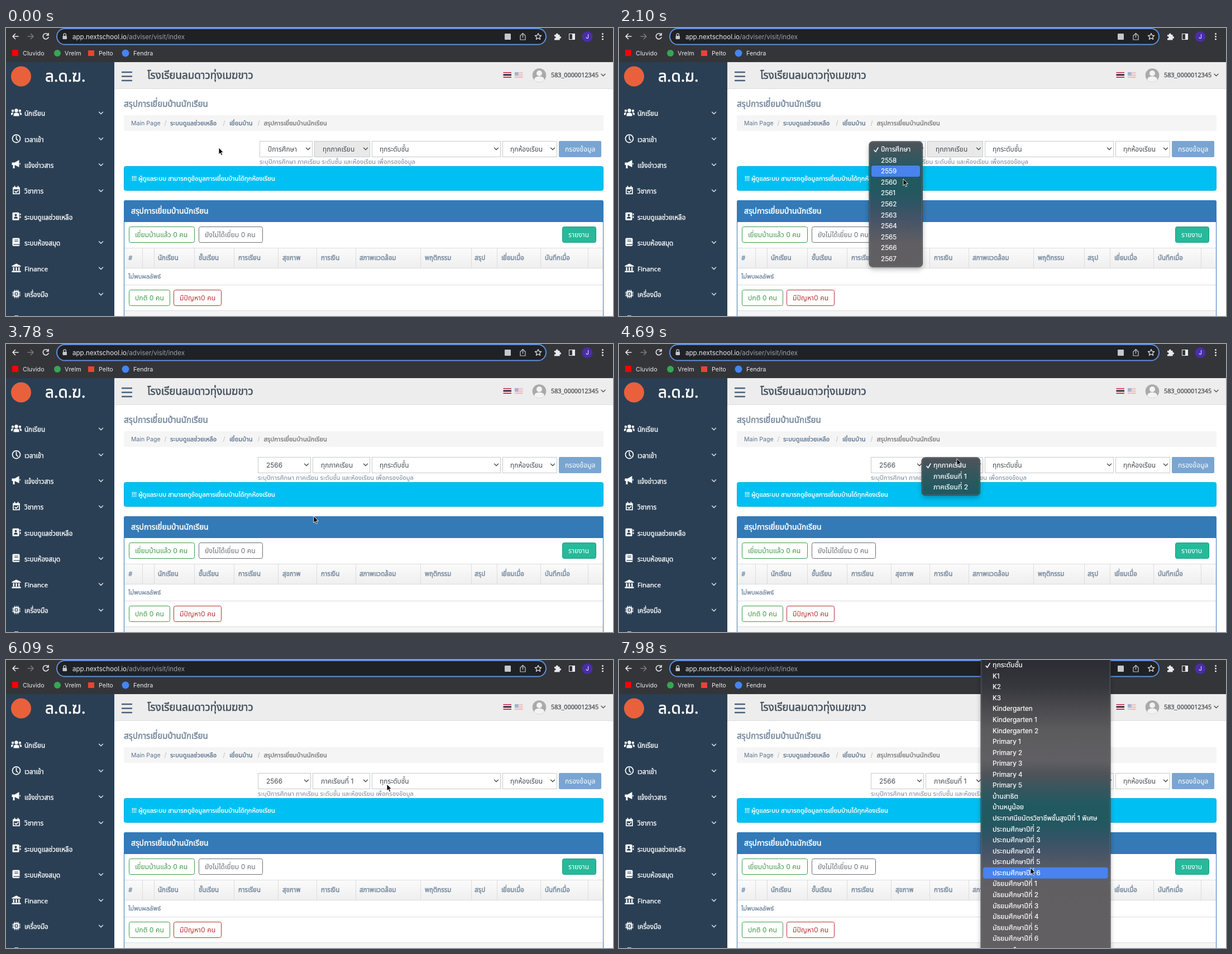
Write an HTML page that moves like this. It is 1087 by 515 pixels and loops after 8000 ms.

```html
<!DOCTYPE html>
<html lang="th">
<head>
<meta charset="utf-8">
<style>
html, body { margin: 0; width: 100%; height: 100%; overflow: hidden; background: #fff; }
svg { display: block; width: 1087px; height: 515px; }
text { font-family: Inter, 'Noto Sans Thai Looped', 'Noto Sans Thai', 'Noto Sans', sans-serif; white-space: pre; }
.b { font-family: 'Noto Sans Thai', 'Noto Sans', sans-serif; }
</style>
</head>
<body>
<svg viewBox="0 0 1087 515">
  <defs>
    <linearGradient id="glass" gradientUnits="userSpaceOnUse" x1="0" y1="0" x2="0" y2="515"></linearGradient>
    <linearGradient id="th" x2="0" y2="1"><stop stop-color="#fbfbfb"/><stop offset="1" stop-color="#efefef"/></linearGradient>
    <filter id="soft" x="-20%" y="-20%" width="140%" height="140%"><feGaussianBlur stdDeviation="5"/></filter>
  </defs>
  <g id="page"></g>
  <g id="live"></g>
</svg>
<script>
const $ = id => document.getElementById(id);
const text = (x, y, s, size, fill, more = '') =>
  `<text x="${x}" y="${y}" font-size="${size}" fill="${fill}" ${more}>${s}</text>`;
// a thin outline gives a medium weight
const medium = (x, y, s, size, fill, w = .35) =>
  text(x, y, s, size, fill, `class="b" stroke="${fill}" stroke-width="${w}"`);
// box given by its left, top, right and bottom edges
const box = (l, t, r, b, fill, more = '') =>
  `<rect x="${l}" y="${t}" width="${r - l}" height="${b - t}" fill="${fill}" ${more}/>`;
const frame = (l, t, r, b, stroke, fill = '#fff', rx = 0) =>
  box(l + .5, t + .5, r - .5, b - .5, fill, `stroke="${stroke}" rx="${rx}"`);
const dot = (x, y, r, fill, more = '') => `<circle cx="${x}" cy="${y}" r="${r}" fill="${fill}" ${more}/>`;
const line = (d, stroke, w = 1.5) =>
  `<path d="${d}" fill="none" stroke="${stroke}" stroke-width="${w}" stroke-linecap="round" stroke-linejoin="round"/>`;
const shape = (d, fill, more = '') => `<path d="${d}" fill="${fill}" ${more}/>`;
const chevron = (x, y, c, w = 1.4, r = 3.5) => line(`M${x - r} ${y - r / 2}l${r} ${r}l${r} ${-r}`, c, w);
const at = (x, y, s) => `<g transform="translate(${x} ${y})">${s}</g>`;

// blurred page seen through the open menus
$('glass').innerHTML = [[0, '#2c2d34'], [50, '#37383d'], [85, '#4a4a4e'], [125, '#5b5a5d'], [180, '#605f63'],
  [205, '#4e5359'], [230, '#37565e'], [258, '#225961'], [290, '#225860'], [315, '#305464'],
  [345, '#475468'], [385, '#605e62'], [515, '#625f62']]
  .map(([y, c]) => `<stop offset="${y / 515}" stop-color="${c}"/>`).join('');

function browserBar() {
  const w = '#e8eaed', g = '#c4c7cb';
  return box(0, 0, 1087, 61, '#343539') +
    line('M22 15H12M16.5 10.5L12 15l4.500 4.500', w, 1.6) +
    line('M39 15h10M44.500 10.500L49 15l-4.500 4.500', '#77797d', 1.6) +
    line('M75.500 12A5 5 0 1 0 76 16.500M76 9.500v3.500h-3.500', w, 1.6) +
    box(91, 1, 967, 29.500, '#202124', 'rx="14.2" stroke="#5f8fdc" stroke-width="2"') +
    box(101.500, 14, 109, 20, g, 'rx="1"') + line('M103 14v-2a2.200 2.200 0 0 1 4.400 0v2', g, 1.3) +
    text(119, 19.500, 'app.nextschool.io<tspan fill="#9aa0a6">/adviser/visit/index</tspan>', 11.6, w) +
    box(893, 10, 904, 21, g, 'rx="1"') +
    line('M923 13h-2v8h9v-8h-2M925.500 17V9.500M922.800 12l2.700-2.700l2.700 2.700', g, 1.2) +
    line('M953 9.500l1.700 3.700l4 .4l-3 2.700l.9 4l-3.600-2.100l-3.600 2.100l.9-4l-3-2.700l4-.4z', w, 1.2) +
    shape('M982 12h3a1.900 1.900 0 1 1 3.600 0h3v3a1.900 1.900 0 1 1 0 3.600v3h-9.600v-3.300a1.700 1.700 0 1 0 0-3z', w) +
    frame(1008, 10, 1019, 21, w, 'none') + box(1014, 10, 1019, 21, w) +
    dot(1041, 15.500, 9.500, '#4a2da8') + text(1041, 19.200, 'J', 10, '#fff', 'text-anchor="middle"') +
    [10.5, 15.2, 20].map(y => dot(1068.500, y, 1.5, w)).join('') +
    box(11, 39, 22, 50, '#f00', 'rx="1"') + dot(92, 45, 6, '#34a853') +
    box(147, 40, 158, 50, '#ea4335') + dot(214, 45, 6.5, '#4285f4') +
    [[30, 'Cluvido'], [105, 'Vrelm'], [166, 'Pelto'], [228, 'Fendra']]
      .map(([x, s]) => text(x, 48.800, s, 10.8, w)).join('');
}

const icons = [
  // people
  dot(0, -4, 3.2, '#fff') + dot(-6.500, -3.500, 2.2, '#fff') + dot(6.500, -3.500, 2.2, '#fff') +
    shape('M-5 6v-2a4 4 0 0 1 4-4h2a4 4 0 0 1 4 4v2zM-9.500 4v-2q0-3 4-2.500l-1.500 4.500zM9.500 4v-2q0-3-4-2.500l1.500 4.500z', '#fff'),
  // clock
  line('M-7 0a7 7 0 1 1 14 0a7 7 0 1 1-14 0M0-4.500V0.500l2.500 2.500', '#fff', 1.7),
  // megaphone
  shape('M-8-3.500h5l8-4.500v13l-8-4v6h-3v-6h-2zM6-3q3 1.500 0 4z', '#fff'),
  // calendar
  line('M-5.500-5h11v11h-11zM-3-7.500v2M3-7.500v2M-2.500 1.500l2 2l3.500-3.500', '#fff', 1.7) + box(-5, -5, 5, -2, '#fff'),
  // address book
  box(-7, -7, 5, 7, '#fff', 'rx="1.5"') + box(6, -5, 8, -2, '#fff') + box(6, 0, 8, 3, '#fff') +
    dot(-1, -2.300, 2, '#2a3f54') + shape('M-4.500 4q0-3.500 3.500-3.500t3.500 3.500z', '#2a3f54'),
  // book
  box(-7, -7.500, 6, 7, '#fff', 'rx="2"') + line('M-3-4H3M-3-1.500H3M-4.500 4.200H5.500', '#2a3f54', 1.2),
  // bank
  shape('M0-8l8 4v1.500h-16v-1.500zM-6-1.500h2.500v6h-2.500zM-1.300-1.500h2.600v6h-2.600zM3.500-1.500h2.500v6h-2.500zM-8 5h16v2.500h-16z', '#fff'),
  // chip
  box(-5, -5, 5, 5, '#fff', 'rx="1"') + line('M-7-3H7M-7 0H7M-7 3H7M-3-7V7M0-7V7M3-7V7', '#fff', 1.2) +
    box(-2.800, -2.800, 2.800, 2.800, '#2a3f54') + box(-1.500, -1.500, 1.500, 1.500, '#fff')
];
const sections = ['นักเรียน', 'เวลาเข้า', 'แจ้งข่าวสาร', 'วิชาการ', 'ระบบดูแลช่วยเหลือ', 'ระบบห้องสมุด', 'Finance', 'เครื่องมือ'];

function sidebar() {
  return box(0, 61, 194, 515, '#2a3f54') + dot(27, 86.500, 18, '#e8613c') +
    medium(70, 96, 'ล.ด.ฆ.', 28, '#fff', .7) +
    sections.map((s, i) => {
      const y = 152.500 + i * 46.3;
      return at(18.500, y - 1, icons[i]) + medium(33, y + 4.800, s, 11.6, '#fff') +
        (i == 4 ? '' : chevron(170, y - .5, '#e6e9ed'));
    }).join('') + box(15, 514, 22, 515, '#d5dae0');
}

function header() {
  const stripes = (x, colors, h) => colors.map((c, i) => box(x, 79 + i * h, x + 14.500, 79 + (i + 1) * h, c)).join('');
  return box(194, 61, 1087, 108, '#ededed') + box(194, 108, 1087, 109, '#d9dee4') +
    [79, 86.5, 94].map(y => line(`M208 ${y}h17`, '#4a6078', 2.4)).join('') +
    medium(253, 90.500, 'โรงเรียนลมดาวทุ่งเมฆขาว', 18.8, '#45525f', .6) +
    stripes(890.500, ['#c8102e', '#fff', '#2d2a4a', '#2d2a4a', '#fff', '#c8102e'], 1.65) +
    stripes(911, ['#eba9ad', '#f8f1f1', '#eba9ad', '#f8f1f1', '#eba9ad', '#f8f1f1', '#eba9ad'], 1.42) +
    box(911, 79, 917.500, 84.500, '#9fb2d6') +
    dot(955, 84.500, 12.3, '#aaa') + dot(955, 81, 5, '#f3f3f3') + shape('M946 93q0-6.500 9-6.500t9 6.500q-9 7.500-18 0z', '#f3f3f3') +
    medium(976, 87.800, '583_0000012345', 10.8, '#515356') + chevron(1069.500, 84, '#515356');
}

function panel() {
  const grey = '#73879c', blue = '#337ab7';
  const outlined = (l, t, r, s, c, x) => frame(l, t, r, t + 29, c, '#fff', 3) + text(x, t + 18.700, s, 12.2, c);
  const columns = [[219, '#'], [272, 'นักเรียน'], [345, 'ชั้นเรียน'], [416, 'การเรียน'], [495, 'สุขภาพ'], [564, 'การเงิน'],
    [633, 'สภาพแวดล้อม'], [750, 'พฤติกรรม'], [839, 'สรุป'], [887, 'เยี่ยมเมื่อ'], [965, 'บันทึกเมื่อ']];
  const edges = [244, 265, 337, 408, 487, 556, 626, 742, 833, 879, 957, 1042];
  return frame(211, 247, 1070, 291, '#00acd6', '#00c0f3', 3) +
    medium(225, 272.500, '!!! ผู้ดูแลระบบ สามารถดูข้อมูลการเยี่ยมบ้านได้ทุกห้องเรียน', 11.3, '#fff') +
    frame(211, 308, 1070, 530, blue, '#fff', 3) + box(211, 308, 1070, 340, blue, 'rx="3"') +
    box(211, 330, 1070, 347, blue) +
    medium(224, 332, 'สรุปการเยี่ยมบ้านนักเรียน', 13.8, '#fff', .5) +
    outlined(220, 355, 338, 'เยี่ยมบ้านแล้ว 0 คน', '#3c9a48', 231) +
    outlined(345, 355, 460, 'ยังไม่ได้เยี่ยม 0 คน', '#696d72', 356) +
    frame(996, 355, 1057, 384, '#169f85', '#26b99a', 3) + text(1007, 373.700, 'รายงาน', 12.2, '#fff') +
    box(212, 393, 1069, 429, 'url(#th)') +
    [393, 429, 459].map(y => box(212, y, 1069, y + 1, '#dcdcdc')).join('') +
    edges.map(x => box(x, 393, x + 1, 429, '#dcdcdc')).join('') +
    columns.map(([x, s]) => medium(x, 415, s, 11.5, grey, .45)).join('') +
    medium(219, 447.800, 'ไม่พบผลลัพธ์', 11.1, grey) +
    outlined(220, 468, 294, 'ปกติ 0 คน', '#3c9a48', 231) +
    outlined(300, 468, 386, 'มีปัญหา0 คน', '#b5302f', 311) +
    box(212, 506, 1069, 515, '#f5f5f5') + box(212, 505, 1069, 506, '#ddd');
}

const crumb = '#5a738e';
$('page').innerHTML = browserBar() + sidebar() + header() +
  medium(211, 141, 'สรุปการเยี่ยมบ้านนักเรียน', 15, '#73879c', .5) +
  box(211, 156, 1070, 184, '#f5f5f5') + text(224, 174, 'Main Page', 10.6, crumb) +
  medium(294, 174, 'ระบบดูแลช่วยเหลือ', 11.2, crumb) + medium(400, 174, 'เยี่ยมบ้าน', 11.3, crumb) +
  medium(461.500, 174, 'สรุปการเยี่ยมบ้านนักเรียน', 11.3, '#777') +
  [283.5, 388.5, 450.5].map(x => text(x, 174, '/', 11, '#bbb')).join('') + panel();

const range = (label, from, to) => Array.from({ length: to - from + 1 }, (_, i) => label + (from + i));
const menus = [
  { open: 1120, close: 3300, l: 448, r: 543.500, items: ['ปีการศึกษา', ...range('', 2558, 2567)] },
  { open: 4500, close: 5470, l: 542, r: 646.500, items: ['ทุกภาคเรียน', ...range('ภาคเรียนที่ ', 1, 2)] },
  { open: 6370, close: 8000, l: 648, r: 880, items: ['ทุกระดับชั้น', ...range('K', 1, 3), 'Kindergarten',
    ...range('Kindergarten ', 1, 2), ...range('Primary ', 1, 5), 'บ้านสาธิต', 'บ้านหนูน้อย',
    'ประกาศนียบัตรวิชาชีพชั้นสูงปีที่ 1 พิเศษ', ...range('ประถมศึกษาปีที่ ', 2, 6),
    ...range('มัธยมศึกษาปีที่ ', 1, 6), ...range('อนุบาล ', 1, 3)] }
];
const clicks = [1100, 3230, 4430, 5400, 6300];
// cursor path: time, x, y
const path = [[0, 381, 214], [300, 381, 214], [1050, 510, 214], [1700, 510, 214], [2870, 507, 377], [3100, 506, 393],
  [3350, 506, 393], [4300, 605, 205], [4750, 605, 205], [5200, 598, 238], [5500, 598, 238], [6090, 682, 222],
  [6250, 690, 218], [6450, 690, 218], [6860, 715, 240], [7140, 738, 299], [7560, 737, 371.5], [8000, 737, 371.5]];
const ROW = 19.56;

function cursorAt(t) {
  const i = Math.max(1, path.findIndex(p => p[0] >= t));
  const [t0, x0, y0] = path[i - 1], [t1, x1, y1] = path[i];
  const u = Math.max(0, (t - t0) / (t1 - t0));
  return [x0 + (x1 - x0) * u, y0 + (y1 - y0) * u];
}

function select(l, r, s, x, fill = '#fff') {
  return frame(l, 202, r, 231, '#c6c9cc', fill) + text(x, 220.800, s, 11.9, '#45484c') + chevron(r - 8, 216, '#45484c', 1.3);
}

function filters(t) {
  const year = t >= 3300, term = t >= 5470, x = year ? 451 : 454;
  return text(x, 242.500, 'ระบุปีการศึกษา ภาคเรียน ระดับชั้น และห้องเรียน เพื่อกรองข้อมูล', 11.2, '#73879c') +
    select(x, x + 95, year ? '2566' : 'ปีการศึกษา', year ? 466 : 469) +
    select(year ? 549 : 552, 652, term ? 'ภาคเรียนที่ 1' : 'ทุกภาคเรียน', year ? 564 : 567, year ? '#fff' : '#e9e9e9') +
    select(655, 886, 'ทุกระดับชั้น', 669) + select(889, 987, 'ทุกห้องเรียน', 903) +
    box(990, 202, 1066, 231, '#7aa5d0', 'rx="2"') + text(1001, 220.800, 'กรองข้อมูล', 12.1, '#fff');
}

function menu({ l, r, items }, t) {
  const shift = l == 648 ? 208 * Math.min(1, Math.max(0, (t - 7630) / 280)) : 0;
  const top = 203 - shift, bottom = top + items.length * ROW + 9;
  const hot = Math.floor((cursorAt(t - 100)[1] - top - 4.200) / ROW);
  const mid = i => top + 14 + i * ROW;
  const size = s => /[ก-๙]/.test(s) ? 12.2 : 11.7;
  return box(l, top + 4, r, bottom + 4, '#000', 'rx="6" opacity=".28" filter="url(#soft)"') +
    box(l, top, r, bottom, 'url(#glass)', 'rx="6" stroke="#3d4245"') +
    box(l + 1, top + 1, r - 1, bottom - 1, 'none', 'rx="5" stroke="#fff" stroke-opacity=".15"') +
    (hot >= 0 && hot < items.length ? box(l + 4, mid(hot) - 10, r - 4.500, mid(hot) + 10, '#4883ee', 'rx="4"') : '') +
    line(`M${l + 9} ${mid(0) + 1.500}l2.500 3l4.500-7.500`, '#fff', 1.6) +
    items.map((s, i) => text(l + 21, mid(i) + 4.200, s, size(s), '#fff', 'stroke="#fff" stroke-width=".2"')).join('');
}

function draw(now) {
  const t = now % 8000, [x, y] = cursorAt(t);
  const shown = menus.find(m => t >= m.open && t < m.close);
  const ring = clicks.some(c => t >= c && t < c + 230);
  $('live').innerHTML = filters(t) + (shown ? menu(shown, t) : '') +
    (ring ? dot(x - 1, y - .5, 17.8, '#fff', 'fill-opacity=".12" stroke="#111" stroke-width="1.6"') : '') +
    at(x, y, shape('M0 0V12l2.700-2.500l2 4.500l2-.9l-2-4.400h3.700z', '#000', 'stroke="#fff" stroke-width=".9"'));
  requestAnimationFrame(draw);
}
requestAnimationFrame(draw);
</script>
</body>
</html>
```
